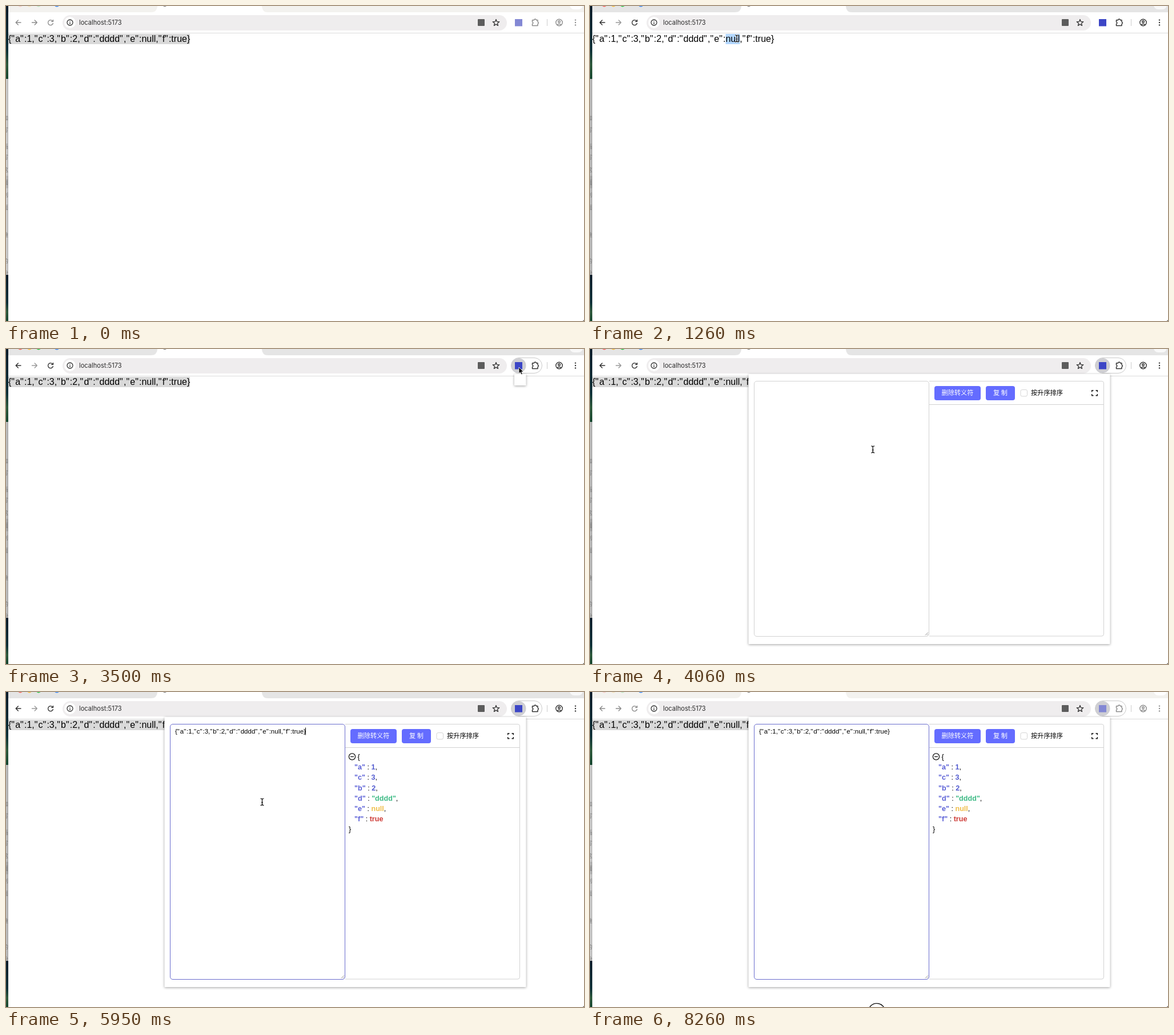
An HTML page for the animation above (8.33 s loop, 1012 by 553 pixels).

```html
<!DOCTYPE html>
<html lang="zh">
<head>
<meta charset="utf-8">
<title>JSON popup</title>
<style>
html, body { margin: 0; width: 100%; height: 100%; overflow: hidden; background: #fff; }
svg { display: block; width: 1012px; height: 553px; }
#stage { --strip: #e5e5e5; --button: #f8f8f8; --ink: #303030; --pale: #999; --lights: 1; --ext: #3c46c6; --side: #c3c3c3; }
#stage.idle { --strip: #f3f2ef; --button: #fff; --ink: #8b8b8b; --pale: #8b8b8b; --lights: .25; --ext: #8388d4; --side: #d3d3d3; }
text { font-family: "Liberation Sans", Arial, sans-serif; white-space: pre; }
.line { fill: none; stroke: var(--ink); stroke-width: 1.4; stroke-linejoin: round; }
.dark { fill: none; stroke: #333; stroke-width: 1.3; stroke-linejoin: round; }
.url { font: 11.1px Inter, sans-serif; fill: #2b2b2b; }
.body { font-size: 16px; }
.body tspan { letter-spacing: 1.15px; }
.input { font-size: 11.5px; }
.input tspan { letter-spacing: .83px; }
.cjk { font: 11.2px "Noto Sans CJK SC", "Noto Sans CJK", sans-serif; }
.bold { font-weight: 500; fill: #fff; }
.side { font: 9px "Noto Sans CJK SC", "Noto Sans CJK", sans-serif; fill: #808080; }
.tree { font-size: 12.6px; }
.tree tspan { font-weight: bold; }
.key { fill: #5a5fd6; }
.num { fill: #525bd0; }
.str { fill: #3fbb86; }
.nil { fill: #f0bf4c; }
.bool { fill: #cf3d38; }
.card { filter: drop-shadow(0 1px 2px rgba(0, 0, 0, .38)); }
</style>
</head>
<body>
<svg id="stage" class="idle" viewBox="0 0 1012 553">
  <defs>
    <linearGradient id="woods" x2="0" y2="1">
      <stop offset="0" stop-color="#0a1d2b"/><stop offset=".6" stop-color="#0d3038"/>
      <stop offset=".8" stop-color="#2f5a3c"/><stop offset="1" stop-color="#15462f"/>
    </linearGradient>
    <linearGradient id="shade"><stop offset="0" stop-opacity="0"/><stop offset="1" stop-opacity=".14"/></linearGradient>
  </defs>

  <!-- windows behind -->
  <rect width="5" height="128" fill="url(#woods)"/>
  <rect y="128" width="5" height="344" fill="var(--side)"/>
  <rect y="298" width="5" height="22" fill="#000" opacity=".1"/>
  <g id="side"></g>
  <rect y="472" width="5" height="81" fill="url(#woods)"/>
  <rect y="128" width="4" height="344" fill="url(#shade)"/>

  <!-- browser -->
  <rect x="4" width="1008" height="553" fill="#fff"/>
  <path d="M4 0H265V1Q264 11 254 11H4ZM448 0H1012V11H458Q449 11 448 1Z" fill="var(--strip)"/>
  <g opacity="var(--lights)">
    <circle cx="25" cy="-3.5" r="5" fill="#ff5f57"/>
    <circle cx="41" cy="-3.5" r="5" fill="#febc2e"/>
    <circle cx="57" cy="-3.5" r="5" fill="#28c840"/>
  </g>
  <circle cx="89" cy="-3" r="4.5" fill="#3f8cf5"/>
  <circle cx="278" cy="-4" r="5" fill="#666"/>
  <rect x="987" y="-14" width="23" height="20" rx="8" fill="var(--button)"/>
  <path d="M4 47.5H1012" stroke="#dcdcdc"/>

  <g class="line">
    <path d="M26.5 29H17.5M21.7 24.5L17.2 29L21.7 33.5"/>
    <path d="M45 29H54M49.8 24.5L54.3 29L49.8 33.5" style="stroke:var(--pale)"/>
    <path d="M81.4 26.1A4.5 4.5 0 1 0 82.5 30M82.5 24V27.3H79.2"/>
    <path d="M921.5 24.8H924.7A1.8 1.8 0 0 1 928.3 24.8H931V28A1.8 1.8 0 0 1 931 31.5V34.5H921.5V31.5A1.8 1.8 0 0 0 921.5 28Z"/>
    <circle cx="968.5" cy="29" r="5.7"/>
    <circle cx="968.5" cy="27.5" r="1.8"/>
    <path d="M964.8 33Q968.5 30 972.2 33"/>
  </g>
  <g fill="var(--ink)">
    <circle cx="997" cy="24.6" r="1.2"/><circle cx="997" cy="29" r="1.2"/><circle cx="997" cy="33.4" r="1.2"/>
  </g>
  <rect x="99" y="16" width="778" height="27" rx="13.5" fill="#efedee"/>
  <circle cx="112" cy="29" r="10" fill="#fff"/>
  <circle class="dark" cx="112" cy="29" r="5"/>
  <path class="dark" d="M112 28.5V32M112 26V27.2"/>
  <text class="url" x="128" y="33.2">localhost:5173</text>
  <rect x="826" y="23" width="12" height="12" rx="1" fill="#5c5c5c"/>
  <path id="star" class="dark"/>
  <path d="M947.5 23V35" stroke="#ccc"/>

  <g id="hover">
    <rect x="884.5" y="15.5" width="54" height="27" rx="13.5" fill="none" stroke="#c9c9c9"/>
    <circle id="spot" cx="897.5" cy="29" r="13"/>
  </g>
  <rect x="891" y="23" width="13" height="12.5" fill="var(--ext)"/>

  <!-- page -->
  <rect id="mark" y="49" height="18"/>
  <text id="page" class="body" x="4" y="63"></text>

  <!-- extension popup -->
  <rect id="seed" class="card" x="890" y="44" width="20.5" height="20" rx="1" fill="#fff"/>
  <g id="popup">
    <rect class="card" x="277.5" y="44" width="633" height="474" rx="1" fill="#fff"/>
    <path d="M594 56.5H896Q899.5 56.5 899.5 60V500Q899.5 504 896 504H594M594 97.5H899.5" fill="none" stroke="#d2d2d2"/>
    <rect id="area" x="287.5" y="56.5" width="306" height="448" rx="4.5" fill="#fff"/>
    <path d="M587 502.5L592 497.5M590 502.5L592 500.5" stroke="#777" stroke-width=".8"/>
    <text id="input" class="input" x="296" y="73"></text>
    <path id="caret" stroke="#000"/>
    <rect x="603" y="65" width="81" height="25" rx="4" fill="#646cff"/>
    <rect x="693" y="65" width="51" height="25" rx="4" fill="#646cff"/>
    <text class="cjk bold" x="615.5" y="81.3">删除转义符</text>
    <text class="cjk bold" x="706" y="81.3">复 制</text>
    <rect x="754" y="71.5" width="11.5" height="11.5" rx="2.5" fill="#fff" stroke="#d5d5d5"/>
    <text class="cjk" x="772" y="81.3">按升序排序</text>
    <path d="M878.7 75.5V72.7H881.5M885.5 72.7H888.3V75.5M888.3 79V81.8H885.5M881.5 81.8H878.7V79" fill="none" stroke="#111" stroke-width="1.4"/>
    <g id="tree" class="tree">
      <circle cx="606" cy="113.5" r="5.6" fill="none" stroke="#111" stroke-width="1.3"/>
      <path d="M603 113.5H609" stroke="#111" stroke-width="1.3"/>
      <text x="615.5" y="118">{</text>
      <text x="600" y="245">}</text>
    </g>
  </g>

  <path d="M1012 550V553H1009Q1012 553 1012 550Z" fill="#222"/>

  <!-- pointer -->
  <g id="pointer">
    <path id="arrow" d="M0 0V11L2.5 8.8L4.3 12.8L6.3 11.9L4.6 8H8Z" fill="#000" stroke="#fff" stroke-width=".8"/>
    <g id="beam" fill="none">
      <path d="M-3 -6Q0 -6 0 -4Q0 -6 3 -6M0 -4V4M-3 6Q0 6 0 4Q0 6 3 6M-1.5 1H1.5" stroke="#fff" stroke-width="2.6"/>
      <path d="M-3 -6Q0 -6 0 -4Q0 -6 3 -6M0 -4V4M-3 6Q0 6 0 4Q0 6 3 6M-1.5 1H1.5" stroke="#000" stroke-width="1.2"/>
    </g>
    <circle id="ring" r="14.4" fill="none" stroke="#111" stroke-width="1.4"/>
  </g>
</svg>
<script>
const LOOP = 8330, STEP = 70;
const $ = id => document.getElementById(id);
const show = (id, on) => { $(id).style.display = on ? '' : 'none'; };
const within = (t, spans) => spans.some(([from, to]) => t >= from && t < to);
const set = (id, attrs) => { for (const k in attrs) $(id).setAttribute(k, attrs[k]); };

const json = '{"a":1,"c":3,"b":2,"d":"dddd","e":null,"f":true}';
// Quotes sit a little wider than the fallback font has them.
for (const id of ['page', 'input']) $(id).innerHTML = json.replace(/"/g, '<tspan>"</tspan>');

const kind = v => v === null ? 'nil' : { number: 'num', string: 'str', boolean: 'bool' }[typeof v];
$('tree').innerHTML += Object.entries(JSON.parse(json)).map(([k, v], i, all) =>
  `<text x="610" y="${136.3 + 18.15 * i}"><tspan class="key">"${k}"</tspan> : ` +
  `<tspan class="${kind(v)}">${JSON.stringify(v)}</tspan>${i < all.length - 1 ? ',' : ''}</text>`).join('');

const sideRows = [196, 217, 246, 265, 287, 309, 331, 353, 401, 447, 468];
$('side').innerHTML = sideRows.map((y, i) =>
  `<text class="side" x="-5" y="${y + 3.5}">${'加写画写这面利面维的分'[i]}</text>`).join('');

$('star').setAttribute('d', 'M' + Array.from({ length: 10 }, (_, i) => {
  const r = i % 2 ? 2.6 : 6, a = Math.PI * (i / 5 - .5);
  return `${(858 + r * Math.cos(a)).toFixed(2)} ${(29.5 + r * Math.sin(a)).toFixed(2)}`;
}).join('L') + 'Z');

const easeOut = k => 1 - (1 - k) ** 2;
const easeBoth = k => k * k * (3 - 2 * k);
// time, x, y, easing of the way there
const path = [
  [0, 502, 561], [140, 502, 561], [210, 418, 459], [770, 256, 56, easeOut],
  [910, 257, 57], [2520, 257, 57], [2590, 490, 54], [3150, 898, 32, easeOut],
  [3500, 898, 32], [4200, 448.5, 193, easeBoth], [6720, 448.5, 193],
  [7210, 525, 531, easeBoth], [7420, 502, 561], [LOOP, 502, 561]
];
const clicks = [[910, 980], [1120, 1260], [1400, 1540], [3290, 3430], [4270, 4480], [8260, LOOP]];
const caretOn = [[4270, 4760], [4900, 5460], [5950, 6510], [7000, 7560], [8050, 8260]];

function pointerAt(t) {
  const i = Math.max(1, path.findIndex(p => p[0] >= t));
  const [t0, x0, y0] = path[i - 1], [t1, x1, y1, ease = k => k] = path[i];
  const k = ease((t - t0) / (t1 - t0));
  return [x0 + (x1 - x0) * k, y0 + (y1 - y0) * k];
}

function mix(a, b, k) {
  return `rgb(${a.map((v, i) => Math.round(v + (b[i] - v) * k))})`;
}

function render(t) {
  const idle = t < 910 || t >= 8260;
  $('stage').setAttribute('class', idle ? 'idle' : '');

  const word = within(t, [[1190, 1400]]);
  set('mark', {
    x: word ? 237.5 : 4, width: word ? 25 : 318,
    fill: t < 910 || t >= 3430 ? '#d9d9d9' : '#b3d7ff'
  });
  show('mark', !within(t, [[1120, 1190]]));

  show('hover', t >= 3080);
  set('spot', { fill: t < 3430 ? '#e6e6e8' : '#cfcfd3' });
  show('seed', within(t, [[3430, 3570]]));
  show('popup', t >= 3570);

  const focus = Math.min(1, Math.max(0, (t - 4200) / 350));
  set('area', { stroke: mix([210, 210, 210], [105, 108, 205], focus) });
  show('input', t >= 4900);
  show('tree', t >= 5250);
  set('caret', { d: `M${t < 4900 ? 297 : 524.5} 62.5V75.5` });
  show('caret', within(t, caretOn));

  const [x, y] = pointerAt(t);
  const overArea = t >= 3570 && x > 288 && x < 593 && y > 57 && y < 504;
  const beam = within(t, [[910, 2590]]) || overArea;
  set('pointer', { transform: `translate(${x.toFixed(2)} ${y.toFixed(2)})` });
  show('beam', beam);
  show('arrow', !beam);
  show('ring', within(t, clicks));
}

function tick() {
  const t = performance.now() % LOOP;
  render(Math.floor(t / STEP) * STEP);
  requestAnimationFrame(tick);
}
tick();
</script>
</body>
</html>
```
